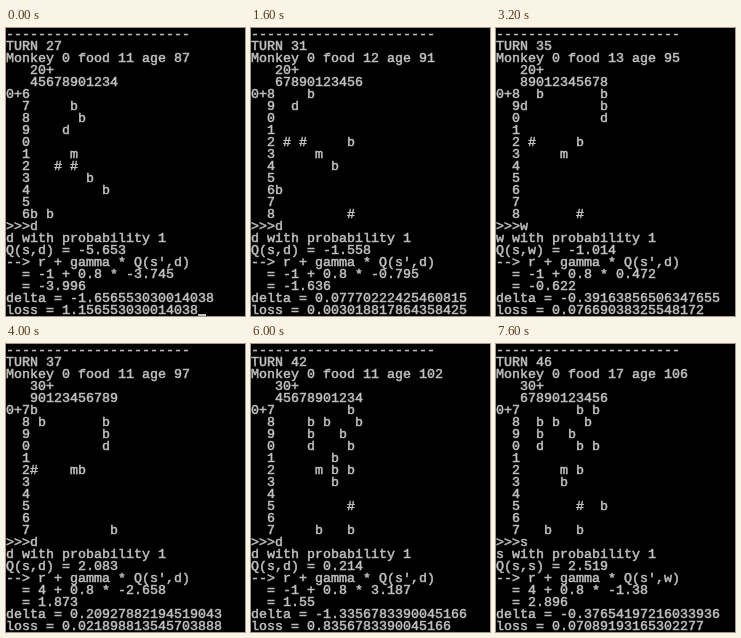
An HTML page for the animation above (8 s loop, 239 by 288 pixels).

```html
<!DOCTYPE html>
<html lang="en">
<head>
<meta charset="utf-8">
<title>Monkey learning log</title>
<style>
html, body { margin: 0; width: 100%; height: 100%; overflow: hidden; background: #000; }
pre {
  position: absolute; left: 0; top: 1px; margin: 0;
  font: 13.333px/12px "Liberation Mono", monospace;
  color: #c0c0c0;
  -webkit-text-stroke: .5px #c0c0c0;
}
#cursor { position: absolute; top: 286px; width: 8px; height: 2px; background: #c0c0c0; }
</style>
</head>
<body>
<pre id="screen"></pre>
<div id="cursor"></div>
<script>
const STEP = 400, SIZE = 11, HALF = 5, FIRST = 27;
const MOVES = { w: [0, -1], s: [0, 1], d: [1, 0] };

// world rows: kind and column of every thing
const world = {
  7: 'b29 b43 b45', 8: 'b30 b38 b40 b44', 9: 'd28 b38 b42', 10: 'd38 b43 b45',
  11: 'b41', 12: '#27 #29 b35 b41 b43', 13: 'b31 b41', 14: 'b33',
  15: '#43 b46', 16: 'b24 b26', 17: 'b39 b43', 18: '#35'
};

// per turn: action, Q, next Q, delta
const turns = [
  ['d', -5.653, -3.745, -1.656553030014038],
  ['d', -3.745, -1.271, -1.7281494140625312],
  ['s', -1.271, 0.942, -1.0246386528015137],
  ['s', 0.942, -1.558, -1.8116071224212646],
  ['d', -1.558, -0.795, 0.07770222425460815],
  ['d', -0.795, 1.776, -1.2157785892486572],
  ['s', 1.776, -2.323, -0.36577892303466797],
  ['w', -2.323, -1.014, -0.5117847061157227],
  ['w', -1.014, 0.472, -0.39163856506347656],
  ['d', 0.472, 2.083, -0.19446271657943726],
  ['d', 2.083, -2.6584, 0.20927882194519043],
  ['d', -2.658, -3.127, 0.8437609672546387],
  ['d', -3.127, -2.835, 0.14097428321838379],
  ['d', -2.835, -3.6033, 1.0481925010681152],
  ['d', -3.603, 0.214, -2.774104595184326],
  ['d', 0.214, 3.187, -1.3356783390045166],
  ['d', 3.187, 3.875, -3.9130237102508545],
  ['w', 3.875, 2.009, -1.7315871715545654],
  ['s', 2.027, 2.519, 1.0120925903320312],
  ['s', 2.519, -1.38, -0.37654197216033936]
];
const cursorOn = [0, 1, 17, 18];

const cells = new Map();
for (const y in world)
  for (const item of world[y].split(' ')) cells.set(item.slice(1) + ',' + y, item[0]);

const round = v => +v.toFixed(3);
const tens = v => Math.floor((v + 1) / 10) * 10 + '+';
const range = start => Array.from({ length: SIZE }, (_, i) => start + i);

function huber(d) {
  const a = Math.abs(d);
  return Math.fround(a < 1 ? Math.fround(d * d) / 2 : a - .5);
}

function drawMap(x, y) {
  const cols = range(x - HALF), rows = range(y - HALF);
  const rowText = (r, i) => (i ? '  ' : tens(r)) + r % 10 +
    cols.map(c => c === x && r === y ? 'm' : cells.get(c + ',' + r) || ' ').join('');
  return ['   ' + tens(cols[0]), '   ' + cols.map(c => c % 10).join(''), ...rows.map(rowText)];
}

let x = 29, y = 11, food = 11;
const screens = turns.map(([act, q, next, delta], i) => {
  const lines = [
    '-'.repeat(23),
    `TURN ${FIRST + i}`,
    `Monkey 0 food ${food} age ${FIRST + 60 + i}`,
    ...drawMap(x, y)
  ];
  x += MOVES[act][0];
  y += MOVES[act][1];
  const spot = x + ',' + y;
  const reward = cells.get(spot) === 'b' ? 4 : -1;
  cells.delete(spot);
  food += reward;
  const nextAct = turns[i + 1] ? turns[i + 1][0] : 'w';
  return [...lines,
    `>>>${act}`,
    `${act} with probability 1`,
    `Q(s,${act}) = ${q}`,
    `--> r + gamma * Q(s',${nextAct})`,
    `  = ${reward} + 0.8 * ${round(next)}`,
    `  = ${round(reward + .8 * next)}`,
    `delta = ${delta}`,
    `loss = ${huber(delta)}`
  ];
});

const screen = document.getElementById('screen');
const cursor = document.getElementById('cursor');
let shown = -1;

function tick(now) {
  const i = Math.floor(now / STEP) % screens.length;
  if (i !== shown) {
    shown = i;
    screen.textContent = screens[i].join('\n');
    cursor.hidden = !cursorOn.includes(i);
    cursor.style.left = screens[i].at(-1).length * 8 + 'px';
  }
  requestAnimationFrame(tick);
}
tick(0);
</script>
</body>
</html>
```
